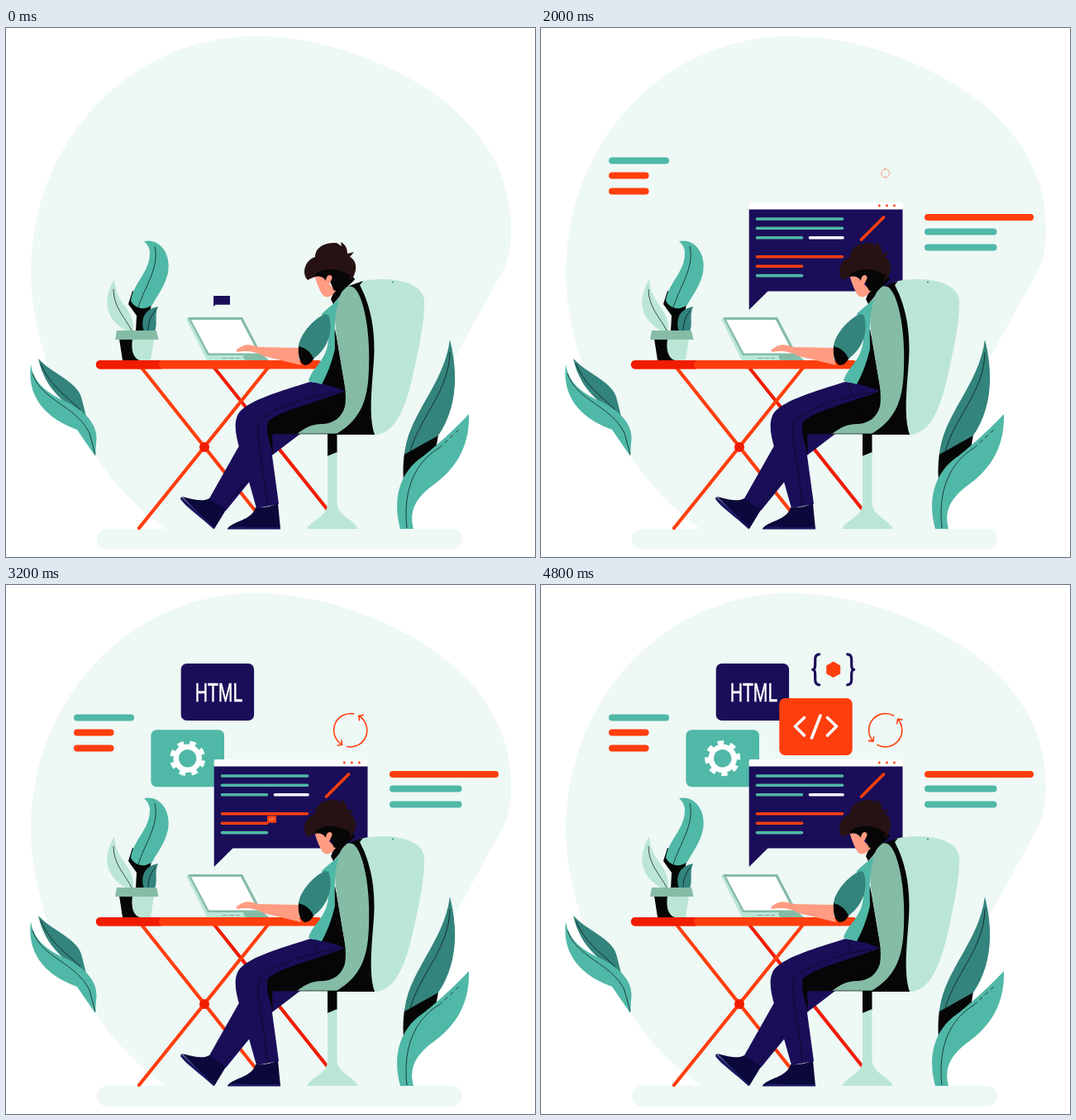
Animation, 640 px wide and 640 px high, one loop 5500 ms. Source, as an HTML page without scripts:

```html
<!DOCTYPE html>
<html lang="en">
<head>
<meta charset="utf-8">
<title>Coding at a desk</title>
<style>
/* One clock in tenths of a second drives every part. */
@property --t { syntax: "<number>"; inherits: true; initial-value: 0; }
@keyframes clock {
  0% { --t: 0; animation-timing-function: steps(48); }
  87.2727%, 100% { --t: 48; }
}
html, body { margin: 0; width: 100%; height: 100%; overflow: hidden; background: #fff; }
svg { display: block; width: 100%; height: 100%; animation: clock 5.5s linear infinite; }

.pale { fill: #eef8f5; } .navy { fill: #1a0e59; } .teal { fill: #50b8a7; }
.deep { fill: #33847c; } .mint { fill: #bbe6d6; } .sage { fill: #85bca6; }
.ink { fill: #060606; } .skin { fill: #ff9c82; } .hair { fill: #261213; }
.fire { fill: #ff3e0d; } .shoe { fill: #0b083c; } .white { fill: #fff; }
.line { fill: none; stroke-linecap: round; stroke-linejoin: round; }
.vein { fill: none; stroke: #0a0a14; stroke-width: .7; }
.o { stroke: #ff3e0d; } .r { stroke: #f01c00; } .g { stroke: #50b8a7; } .w { stroke: #fff; }

/* --s is the start and --d the length of a part's entrance. */
.in { --p: clamp(0, (var(--t) - var(--s)) / var(--d), 1); }
.pen {
  fill: none; stroke-linecap: round; stroke-dasharray: 1 2;
  stroke-dashoffset: calc(1.05px * (1 - var(--p)));
}
.pop { transform: scale(var(--p)); }
.fly {
  transform: translate(calc(var(--x) * (1 - var(--p))), calc(var(--y) * (1 - var(--p)))) scale(var(--p));
}
.window {
  --q: (var(--t) / 6 - 1);
  --b: min(0, var(--q));
  transform-origin: 251px 336.6px;
  transform: scale(calc(1 + 2.193 * var(--b) * var(--b) * var(--b) + 1.3 * var(--b) * var(--b)));
}
.spin {
  --u: (var(--t) - 16 - 10 * (clamp(0, var(--t) - 25, 1) + clamp(0, var(--t) - 35, 1) + clamp(0, var(--t) - 45, 1)));
  transform: rotate(calc(-1deg * (19.5 * var(--u) + 11.5 * max(0, var(--u) - 2)
    + 37 * max(0, var(--u) - 4) - 37.25 * max(0, var(--u) - 6))));
}
.cog { transform: rotate(calc(4deg * (var(--t) - 30))); }
.foot {
  --w: sin(var(--t) * 45deg);
  transform-origin: 250px 604px;
  transform: rotate(calc(3deg * var(--w) * var(--w)));
}
text { font: 32px "Liberation Sans", Arial, sans-serif; text-anchor: middle; stroke: #fff; stroke-width: .6; }
</style>
</head>
<body>
<svg viewBox="0 0 640 640">
  <path class="pale" d="M302 10C362 10 420 28 458 46C545 85 611 150 611 243C611 264 608 280 601 294L549 388C524 436 500 480 490 520C484 556 482 584 480 606H193C160 582 132 554 110 520C84 484 58 440 46 394C34 352 30 322 30 294C32 136 150 10 302 10Z"/>
  <rect class="pale" x="110" y="606" width="442" height="24.500" rx="12"/>

  <!-- floating text rows -->
  <g stroke-width="8">
    <path class="in pen g" style="--s:12;--d:3" pathLength="1" d="M86 160.500H151"/>
    <path class="in pen o" style="--s:13;--d:3" pathLength="1" d="M86 178.500H126.500"/>
    <path class="in pen o" style="--s:14;--d:3" pathLength="1" d="M86 197.500H126.500"/>
    <path class="in pen o" style="--s:15;--d:4.2" pathLength="1" d="M468 229H592"/>
    <path class="in pen g" style="--s:15.5;--d:4" pathLength="1" d="M468 246.500H547.500"/>
    <path class="in pen g" style="--s:16;--d:4" pathLength="1" d="M468 265.500H547.500"/>
  </g>

  <!-- settings card -->
  <g transform="translate(219.700 209.800)">
    <rect class="in pop teal" style="--s:23.2;--d:2.8" x="-44.300" y="-34.500" width="88.600" height="69" rx="7"/>
    <g class="in pop" style="--s:25.2;--d:3">
      <g class="cog line w">
        <circle r="14" stroke-width="6.500"/>
        <circle r="18.700" stroke-width="5.600" pathLength="16" stroke-dasharray="1 1" stroke-linecap="butt"/>
      </g>
    </g>
  </g>

  <!-- editor window -->
  <g class="window">
    <path class="navy" d="M251.700 219H437.500V318.400H274.500L251.700 341Z"/>
    <path class="white" d="M251.700 219.500V213Q251.700 211 253.700 211H435.500Q437.500 211 437.500 213V219.500Z"/>
    <g class="fire"><circle cx="409.300" cy="215" r="1.400"/><circle cx="418.400" cy="215" r="1.400"/><circle cx="427.400" cy="215" r="1.400"/></g>
  </g>
  <g stroke-width="3.600">
    <path class="in pen g" style="--s:6;--d:2.5" pathLength="1" d="M261.500 231H364.500"/>
    <path class="in pen g" style="--s:6.5;--d:2.5" pathLength="1" d="M261.500 242.300H364.500"/>
    <path class="in pen g" style="--s:7;--d:2.5" pathLength="1" d="M261.500 253.800H315.500"/>
    <path class="in pen w" style="--s:7.5;--d:2.5" pathLength="1" d="M325.500 253.800H365"/>
    <path class="in pen o" style="--s:8;--d:2.5" pathLength="1" d="M261.500 276.800H364.500"/>
    <path class="in pen o" style="--s:8.5;--d:2.5" pathLength="1" d="M261.500 288.200H315.500"/>
    <path class="in pen g" style="--s:9;--d:2.5" pathLength="1" d="M261.500 299.600H315.500"/>
    <path class="in pen o" style="--s:9;--d:2.5" pathLength="1" d="M387.500 256L414.500 229"/>
  </g>

  <!-- refresh arrows -->
  <g transform="translate(416.700 175.700)">
    <g class="in pop" style="--s:19;--d:4">
      <g class="spin line o" stroke-width="1.600">
        <path id="turn" d="M18.800 -7.500A20.200 20.200 0 0 0 -20.100 1M-23.800 -3L-20.100 1.200L-16 -2.600"/>
        <use href="#turn" transform="rotate(180)"/>
      </g>
    </g>
  </g>

  <!-- flying cards -->
  <g transform="translate(255.900 129.500)">
    <g class="in fly" style="--s:28;--d:4;--x:65px;--y:150px">
      <rect class="navy" x="-44.200" y="-34.500" width="88.400" height="69" rx="7"/>
      <text class="white" transform="translate(1.500 11.500) scale(.66 1)">HTML</text>
    </g>
  </g>
  <g transform="translate(332.500 171.500)">
    <g class="in fly" style="--s:31.5;--d:4;--x:-12.5px;--y:128px">
      <rect class="fire" x="-44.200" y="-34.500" width="88.400" height="69" rx="7"/>
      <path class="line w" stroke-width="3.600" d="M-14 -11L-25 -.500L-14 10.500M5.500 -13.500L-5 13.500M14 -11L25 -.500L14 10.500"/>
    </g>
  </g>
  <g transform="translate(353.700 102.300)">
    <g class="in pop" style="--s:35.5;--d:4">
      <path class="fire" d="M0 -9.800L8.500 -4.900V4.900L0 9.800L-8.500 4.900V-4.900Z"/>
      <g class="line" stroke="#1a0e59" stroke-width="3.200">
        <path id="brace" d="M-17 -18.500Q-22 -18.500 -22 -12V-6Q-22 0 -25 0Q-22 0 -22 6V12Q-22 18.500 -17 18.500"/>
        <use href="#brace" transform="scale(-1 1)"/>
      </g>
    </g>
  </g>

  <!-- left leaves -->
  <path class="deep" d="M39 400C58 420 88 428 92 450L97 470C74 456 48 440 39 400Z"/>
  <path class="teal" d="M30 407C33 428 48 440 66 449C92 460 113 478 109 502L108 518L86 486C58 476 24 454 30 407Z"/>
  <path class="vein" d="M32 418C44 452 84 456 101 490L108 516M42 406C54 434 74 446 90 462"/>

  <!-- right leaves -->
  <path class="ink" d="M482 514L523 492L520 510L482 556C480 542 480 530 482 514Z"/>
  <path class="deep" d="M537 377C549 424 543 464 523 493L482 516C486 468 530 432 537 377Z"/>
  <path class="teal" d="M560 467C561 502 548 530 518 552C496 568 487 584 493 606H477C468 574 474 540 502 520C524 503 540 488 560 467Z"/>
  <path class="vein" d="M537 392C536 440 502 468 489 512M485 605C480 560 494 526 524 508"/>
  <path class="vein" stroke-dasharray="5 4" d="M524 508L550 484"/>

  <!-- potted plant -->
  <path class="ink" d="M153 318L148 334L158 348L157 367H170L176 334Z"/>
  <path class="teal" d="M167 258C187 254 200 274 196 296C192 313 184 322 177 335C168 342 156 340 151 330C154 308 174 296 174 272C174 266 171 262 167 258Z"/>
  <path class="deep" d="M184 337C168 340 162 352 167 367H180C184 358 179 348 184 337Z"/>
  <path class="mint" d="M131 304C116 330 120 352 146 367H154C156 338 133 336 131 304Z"/>
  <path class="vein" d="M180 264C186 290 168 312 160 338M130 316C130 338 144 350 152 366M181 341C174 350 172 358 172 366"/>
  <path class="ink" d="M137 376H158L162 402H141Z"/>
  <path class="mint" d="M153 376H179L175 402H162C154 400 151 390 153 376Z"/>
  <path class="sage" d="M134 366H182L184.500 377H132Z"/>

  <!-- table -->
  <g class="line" stroke-width="4.200">
    <path class="r" d="M252 411L390 584"/>
    <path class="o" d="M164 411L303 586M317 411L161 605"/>
  </g>
  <circle cx="240" cy="507" r="6" fill="#f01c00"/>
  <path class="line o" stroke-width="10.400" d="M114 407.200H378"/>
  <path d="M188 402H114A5.200 5.200 0 0 0 114 412.400H188Q182 407 188 402Z" fill="#f01c00"/>

  <!-- laptop -->
  <path class="mint" d="M218 352L222 350L246 395H312L318 402H243Z"/>
  <path class="sage" d="M220 350H286L310 396H244ZM288 396H311L318 402H290Q286 399 288 396Z"/>
  <path class="white" d="M224 353H284L305 393.500H245.500Z"/>
  <path class="vein" stroke-dasharray="6 2" d="M262 399.500H283" opacity=".4"/>

  <!-- chair -->
  <path class="ink" d="M389 490H400.500V514L389 518Z"/>
  <path class="mint" d="M389 518L400.500 513V575C401 590 420 594 426 606H364C370 594 389 592 389 575Z"/>
  <path class="mint" d="M428 307C446 302 500 300 506 328C507 352 500 386 494 412C486 450 474 492 446 492H430Z"/>
  <path class="ink" d="M412 313L432 306L428 311C436 326 446 352 445.500 390C445 420 437 465 446 492H390L410 440Z"/>
  <circle cx="468" cy="307.500" r="1" class="deep"/>

  <!-- back leg and shoe -->
  <path class="navy" d="M284 502L245 571L266 584L318 520L356 491L330 470Z"/>
  <path class="vein" d="M298 540L262 581"/>
  <g class="foot">
    <path class="shoe" d="M213 567C226 570 238 574 246 569L266 583L252 606Z"/>
    <path d="M212 567L251.500 603.500V606.500C236 592 218 580 211 570Z" fill="#1b1862"/>
  </g>

  <!-- jacket and front leg -->
  <path class="ink" d="M398 364L411 438L418 458L390 478L320 492L300 484L318 452L376 428Z"/>
  <path class="navy" d="M368 428C330 440 296 450 283 464C274 475 278 494 283 510L303 581L330 576L321 510C318 494 314 484 317 477C330 462 382 452 410 439C396 434 384 430 368 428Z"/>
  <path class="vein" d="M400 441C360 446 320 462 307 476C300 490 314 540 316 578M372 431C374 440 376 446 384 449"/>
  <path class="ink" d="M317 476C334 462 386 450 410 439L412 458C404 468 384 462 376 474L352 479L322 491L323 516C318 500 314 486 317 476Z"/>
  <path class="ink" d="M320 491L352 470H400V491Z"/>
  <path class="sage" d="M412 313C404 317 398 324 398 340C397 362 402 384 405 404C408 424 413 442 410 458C406 472 396 478 384 479C368 479 362 484 352 491H400C432 472 438 446 439 412C441 372 434 326 421 314Q416 311 412 313Z"/>
  <path class="vein" d="M320 491H446M399 372L410 440"/>
  <path class="shoe" d="M268 606C272 597 298 596 302 580Q318 581 329 575L332 606Z"/>
  <path d="M268 606C278 601 286 604 298 604H332V606.500H268Z" fill="#1b1862"/>

  <!-- shirt and arm -->
  <path class="teal" d="M382 346C390 338 398 332 403 329C396 348 398 372 398 388C394 406 388 420 382 431L366 427C370 410 390 402 390 374Z"/>
  <path class="skin" d="M278 390C284 385 291 382 298 384L306 386L355 387Q352 396 357 408L312 397C302 391 290 390 280 392Z"/>
  <path class="ink" d="M354 384C353 396 355 405 361 408C367 408 370 404 373 399C368 390 362 386 354 384Z"/>
  <path class="deep" d="M386 346C372 352 356 370 354 385C362 387 369 392 372 400C390 388 397 364 390 347Z"/>

  <!-- head -->
  <path class="ink" d="M386 294L412 290L422 304C416 312 408 314 404 324L396 334L393 328L398 316L390 304Z"/>
  <path class="skin" d="M373 298C376 310 380 318 383 323C388 328 394 325 399 318L391 310L396 300L390 294Z"/>
  <path class="hair" d="M365 305C358 298 360 282 374 277C374 264 388 259 400 260L406 264L405 259C411 262 413 267 413 273L421 271L416 277C426 282 425 296 417 306C414 294 396 294 386 298C380 300 371 301 365 305Z"/>
  <path class="ink" d="M375 297C386 289 404 290 417 300L410 312L397 318L393 309C396 304 395 298 391 299C388 300 387 303 387 306C385 302 381 300 373 300Z"/>
</svg>
</body>
</html>
```
